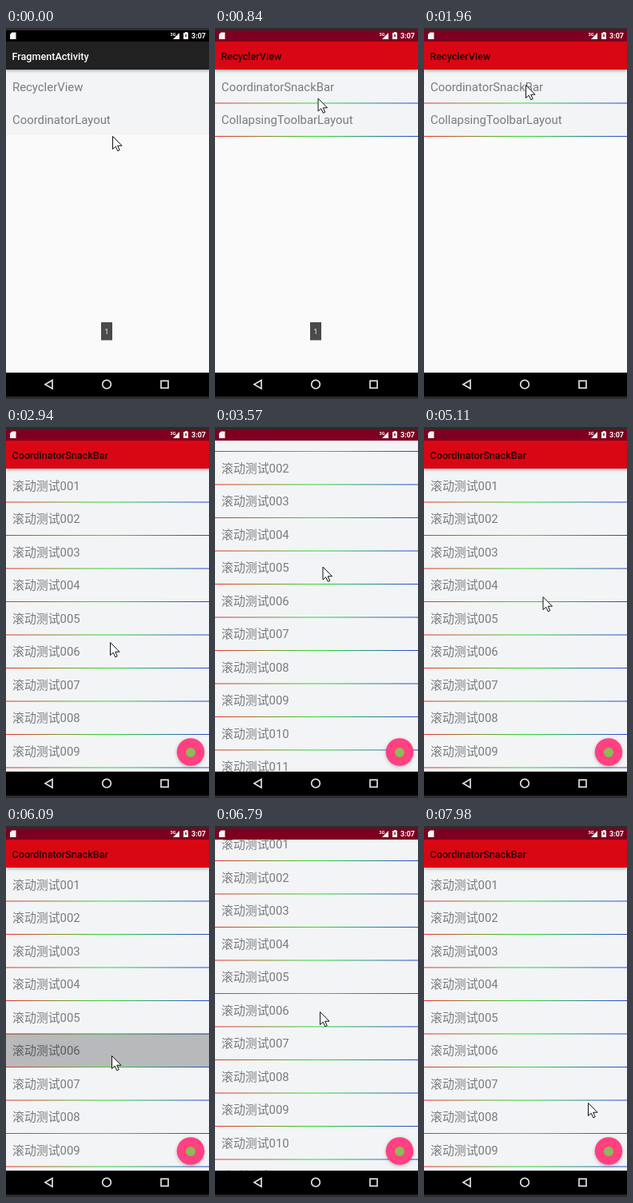
Recreate the animation shown at these times as an HTML page with a canvas. Size 254 by 464 pixels, loop 8 s.

```html
<!DOCTYPE html>
<html lang="zh-CN">
<head>
<meta charset="utf-8">
<style>
  html, body { margin: 0; width: 100%; height: 100%; overflow: hidden; background: #2b2b2b }
  canvas { display: block }
</style>
</head>
<body>
<canvas id="stage" width="254" height="464"></canvas>
<script>
const c = document.getElementById('stage').getContext('2d');
const LOOP = 8000, STEP = 70, W = 254;
const STATUS = 17, BAR = 35, TOP = STATUS + BAR, ROW = 41.5, NAV = 431, END = 461;
const FONT = 'Roboto, "Noto Sans CJK SC", "Noto Sans CJK", sans-serif';

const rainbow = c.createLinearGradient(0, 0, W, 0);
['#e8302a', '#2edc2e', '#2c44d4'].forEach((color, i) => rainbow.addColorStop(i / 2, color));

const dark = { status: '#000', bar: '#212121', ink: '#fff' };
const red = { status: '#7d0020', bar: '#d90713', ink: '#200204', lines: true };
const screens = {
  main: { ...dark, title: 'FragmentActivity', rows: ['RecyclerView', 'CoordinatorLayout'] },
  recycler: { ...red, title: 'RecyclerView', rows: ['CoordinatorSnackBar', 'CollapsingToolbarLayout'] },
  snack: { ...red, title: 'CoordinatorSnackBar', fab: true,
           rows: Array.from({ length: 16 }, (_, i) => '滚动测试' + String(i + 1).padStart(3, '0')) }
};

// Pointer moves; while dragging, the list scrolls by how far the pointer is above `grip`.
const rest = { x: 133, y: 135 };
const moves = [
  { from: 560, to: 980, x: 127, y: 71 },
  { from: 2520, to: 2940, x: 130, y: 269 },
  { from: 2940, to: 4200, x: 139, y: 80, grip: 238 },
  { from: 4370, to: 4760, x: 150, y: 276, grip: 238 },
  { from: 4970, to: 5250, x: 147, y: 148 },
  { from: 5320, to: 5950, x: 132, y: 287 },
  { from: 6230, to: 6790, x: 131, y: 232, grip: 282.5 },
  { from: 6930, to: 7630, x: 138, y: 295, grip: 282.5 },
  { from: 7770, to: 7980, x: 205, y: 346 }
];

const ramp = (t, a, b) => Math.min(1, Math.max(0, (t - a) / (b - a)));
const ease = p => p * p * (3 - 2 * p);

function pose(t) {
  let { x, y } = rest, grip = 0;
  for (const m of moves) {
    if (t < m.from) break;
    const p = ease(ramp(t, m.from, m.to));
    x += (m.x - x) * p;
    y += (m.y - y) * p;
    grip = m.grip || 0;
  }
  return { x, y, scroll: Math.max(0, grip - y) };
}

function rect(x, y, w, h, fill) {
  c.fillStyle = fill;
  c.fillRect(x, y, w, h);
}

function text(s, x, y, size, fill, weight = 400) {
  c.font = `${weight} ${size}px ${FONT}`;
  c.fillStyle = fill;
  c.fillText(s, x, y);
}

function disc(x, y, r, fill) {
  c.beginPath();
  c.arc(x, y, r, 0, 7);
  c.fillStyle = fill;
  c.fill();
}

function clip(x, y, w, h, draw) {
  c.save();
  c.beginPath();
  c.rect(x, y, w, h);
  c.clip();
  draw();
  c.restore();
}

function withShadow(blur, y, alpha, draw) {
  c.save();
  c.shadowColor = `rgba(0,0,0,${alpha})`;
  c.shadowBlur = blur;
  c.shadowOffsetY = y;
  draw();
  c.restore();
}

// press: { row, x, y, spread, alpha }
function drawRow(s, i, y, press) {
  text(s.rows[i], 8, y + 26.6, 14.9, '#7b7b7d');
  if (press && press.row === i) clip(0, y, W, ROW, () => {
    rect(0, y, W, ROW, `rgba(0,0,0,${press.alpha * .55})`);
    disc(press.x, press.y, press.spread * 210, `rgba(0,0,0,${press.alpha * .5})`);
  });
  if (s.lines) rect(0, y + ROW, W, 1, rainbow);
}

function drawScreen(s, scroll, press) {
  rect(0, 0, W, STATUS, s.status);
  rect(0, NAV, W, 40, '#000');
  clip(0, STATUS, W, NAV - STATUS, () => {
    rect(0, STATUS, W, NAV, '#fafafa');
    rect(0, TOP - scroll, W, s.rows.length * ROW - (s.lines ? 0 : 1), '#f2f4f6');
    s.rows.forEach((_, i) => drawRow(s, i, TOP - scroll + i * ROW, press));
    const barY = STATUS - Math.min(BAR, scroll);
    if (barY + BAR > STATUS) {
      withShadow(4, 1, .4, () => rect(0, barY, W, BAR, s.bar));
      text(s.title, 7.5, barY + 23, 12.6, s.ink, 500);
    }
    if (s.fab) {
      withShadow(4, 1.5, .25, () => disc(231, 406.5, 17.3, '#ff4081'));
      disc(231, 407, 6, '#8dbb55');
    }
  });
}

// The new window rises while fading in.
function openScreen(s, t, start, scroll, press) {
  if (t < start) return;
  c.save();
  c.globalAlpha = ramp(t, start, start + 200);
  c.translate(0, 37 * (1 - ramp(t, start, start + 280)) ** 3);
  drawScreen(s, scroll, press);
  c.restore();
}

function drawSystemIcons() {
  c.fillStyle = '#f4f4f4';
  c.fill(new Path2D('M7.5 5.5H12.5V14H5V8Z'));
  c.fill(new Path2D('M217 6V14H209Z'));
  text('3G', 205.5, 10, 5.5, '#fff', 700);
  rect(224, 5, 3, 1, '#fff');
  rect(222, 6, 6, 8, '#f4e8e8');
  rect(224, 8, 2, 3, '#8a5a60');
  text('3:07', 232, 13.4, 9, '#fff', 700);

  c.strokeStyle = '#e0e0e0';
  c.lineWidth = 1.7;
  c.stroke(new Path2D('M58 440.5V451L49 445.7Z'));
  c.beginPath();
  c.arc(126, 445.7, 5.3, 0, 7);
  c.stroke();
  c.strokeRect(194, 441.3, 9, 9);
}

function drawToast(alpha) {
  c.save();
  c.globalAlpha = alpha;
  rect(119, 368, 14, 22.5, '#4a4a4a');
  text('1', 123.3, 383, 9.5, '#eee');
  c.restore();
}

const arrow = new Path2D('M0 0V16L3.7 12.7L6.3 18.3L8.7 17.2L6.2 11.7H11.5Z');

function drawPointer(x, y) {
  c.save();
  c.translate(x + .5, y + .5);
  c.fillStyle = '#fff';
  c.fill(arrow);
  c.strokeStyle = '#111';
  c.lineWidth = 1;
  c.stroke(arrow);
  c.restore();
}

function draw(t) {
  const { x, y, scroll } = pose(t);
  const tap = t >= 1120 && t < 1610 &&
    { row: 0, x: 133, y: 73, spread: ramp(t, 1050, 1400), alpha: .28 * (1 - ramp(t, 1400, 1610)) };
  const hold = t >= 6090 && t < 6300 && { row: 5, x: 132, y: 287, spread: 1, alpha: .25 };

  rect(0, 0, W, 464, '#2e2b2c');
  clip(0, 3, W, END - 3, () => {
    drawScreen(screens.main, 0);
    openScreen(screens.recycler, t, 230, 0, tap);
    openScreen(screens.snack, t, 1965, scroll, hold);
    drawSystemIcons();
  });
  drawToast(1 - ramp(t, 1050, 1470));
  drawPointer(x, y);
}

function tick() {
  const t = performance.now() % LOOP;
  draw(Math.floor(t / STEP) * STEP);
  requestAnimationFrame(tick);
}
tick();
</script>
</body>
</html>
```
